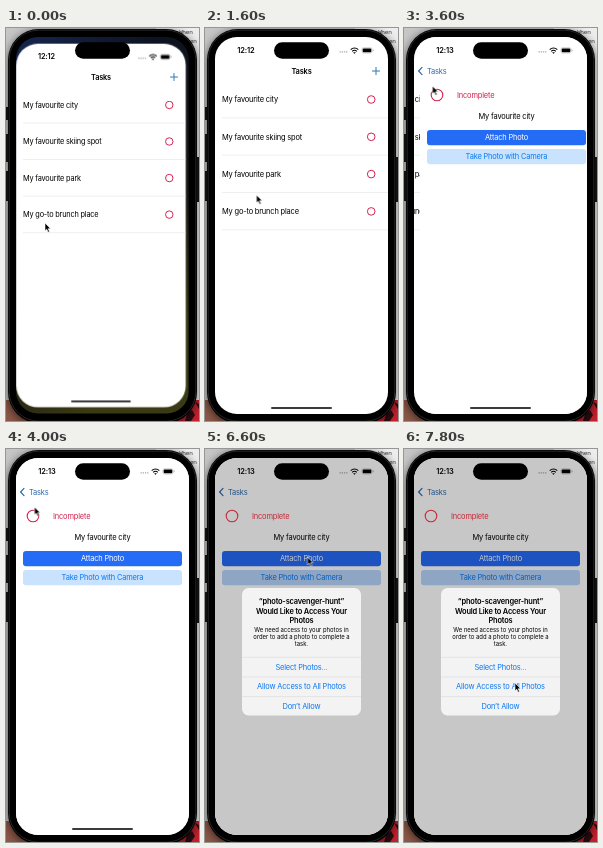
These frames come from a looping animation (193 by 393 pixels, 8000 ms). An HTML page:

```html
<!DOCTYPE html>
<html lang="en">
<head>
<meta charset="utf-8">
<title>Tasks</title>
<style>
html, body { margin: 0; width: 100%; height: 100%; overflow: hidden; background: #cfcfcf; }
svg, .app { position: absolute; left: 0; top: 0; }
svg { overflow: hidden; }
text { font: 7.48px Inter, "Open Sans", sans-serif; letter-spacing: -.025em; }
.mono { font: 6px "Noto Sans Mono", monospace; fill: #333; }
.bold { font-weight: 600; }
.mid { text-anchor: middle; }
.small { font-size: 5.9px; letter-spacing: 0; }
.ring { fill: none; stroke: currentColor; }
.pink { color: #d3214f; }
.line { stroke: #e4e4e6; stroke-width: .6; }
.tint { fill: #0a78f0; }
.shadow { filter: blur(5px); }
.app {
  left: 10px; top: 9px; width: 172.6px; height: 376.5px;
  overflow: hidden; border-radius: 22px; background: #fff; transform-origin: 0 0;
}
.home {
  position: absolute; left: 56px; bottom: 5px; width: 61px; height: 2px;
  border-radius: 1px; background: #3b3b3d;
}

/* The scene advances in 200 ms ticks: 2.5% of the loop each. */
.app, .list, .detail, .list-nav, .detail-nav, .before, .after,
.dim, .home, .take, .status, .cursor {
  animation: 8s step-end infinite;
}
.app { animation-name: launch; }
.list { animation-name: list; }
.detail { animation-name: detail; }
.list-nav { animation-name: fade-out; }
.detail-nav { animation-name: fade-in; }
.before { animation-name: before; }
.after { animation-name: after; }
.dim { animation-name: dim; }
.home { animation-name: home; }
.take { animation-name: take; }
.status { animation-name: status; }
.cursor { animation-name: cursor; }

@keyframes launch {
  0% { transform: translate(.2px, 6.7px) scale(.98); height: 370.7px; }
  2.5%, 100% { transform: none; height: 376.5px; }
}
@keyframes list {
  0% { transform: none; }
  42.5% { transform: translateX(-36px); }
  45%, 100% { transform: translateX(-50px); }
}
@keyframes detail {
  0% { transform: translateX(174px); }
  42.5% { transform: translateX(50px); }
  45% { transform: translateX(6px); }
  47.5%, 100% { transform: none; }
}
@keyframes fade-out { 0% { opacity: 1; } 42.5% { opacity: .3; } 45%, 100% { opacity: 0; } }
@keyframes fade-in { 0% { opacity: 0; } 42.5% { opacity: .7; } 45%, 100% { opacity: 1; } }
@keyframes before { 0% { opacity: 1; } 42.5%, 100% { opacity: 0; } }
@keyframes after { 0% { opacity: 0; } 42.5%, 100% { opacity: 1; } }
@keyframes dim { 0% { opacity: 0; } 77.5% { opacity: .5; } 80%, 100% { opacity: 1; } }
@keyframes home { 0% { opacity: 1; } 77.5% { opacity: .5; } 80%, 100% { opacity: 0; } }
@keyframes take { 0% { fill: #c9e3ff; } 77.5%, 100% { fill: #b6d4fc; } }
@keyframes status { 0% { color: #d3214f; } 77.5%, 100% { color: #ff3347; } }
@keyframes cursor {
  0% { transform: translate(39px, 195px); }
  17.5% { transform: translate(39px, 195px); animation-timing-function: steps(4); }
  27.5% { transform: translate(89px, 83px); }
  35% { transform: translate(89px, 83px); animation-timing-function: steps(3); }
  42.5% { transform: translate(28.5px, 58px); }
  60% { transform: translate(28.5px, 58px); animation-timing-function: steps(4); }
  70% { transform: translate(102.5px, 108px); }
  87.5% { transform: translate(102.5px, 108px); animation-timing-function: steps(3); }
  95%, 100% { transform: translate(111px, 234px); }
}
</style>
</head>
<body>
<!-- Desktop and phone body -->
<svg width="193" height="393" viewBox="0 0 193 393">
  <defs>
    <linearGradient id="wallpaper" x1="0" y1="0" x2=".4" y2="1">
      <stop offset="0" stop-color="#16264f"/>
      <stop offset=".3" stop-color="#0c1220"/>
      <stop offset=".7" stop-color="#1c1a14"/>
      <stop offset="1" stop-color="#3a3a14"/>
    </linearGradient>
  </defs>
  <rect width="193" height="393" fill="#c6c6c6"/>
  <rect x="150" width="43" height="393" fill="#ededed"/>
  <text class="mono" x="166" y="6">l When</text>
  <text class="mono" x="177" y="15">When</text>
  <rect y="372" width="40" height="21" fill="#8b5848"/>
  <rect x="150" y="372" width="43" height="21" fill="#c4202c"/>
  <path d="M181 386l5-4 3 5-4 6h-6zM189 374l4 2v5z" fill="#2a0c10"/>
  <rect class="shadow" x="2" y="3" width="189" height="394" rx="31" opacity=".6"/>
  <path d="M0 79h3v13H0zM0 106h3v28H0zM0 143h3v30H0zM190 129h3v45h-3z" fill="#111"/>
  <rect x="2" y="1" width="189" height="394" rx="31" fill="#000"/>
  <rect x="3.2" y="2.2" width="186.6" height="391" rx="29.5" fill="none" stroke="#303032" stroke-width=".8"/>
  <rect x="10" y="9" width="172.6" height="376.5" rx="22" fill="url(#wallpaper)"/>
</svg>

<div class="app">
  <svg width="173" height="377" viewBox="10 9 173 377">
    <g class="list pink" id="list"></g>

    <g class="detail">
      <rect x="10" y="9" width="173" height="377" fill="#fff"/>
      <g class="status">
        <circle class="ring" cx="27" cy="67" r="5.8" stroke-width="1.1"/>
        <text x="47" y="69.7" fill="currentColor">Incomplete</text>
      </g>
      <text class="mid" x="96.5" y="90.7">My favourite city</text>
      <rect x="17" y="102" width="159" height="15.2" rx="3" fill="#246bf6"/>
      <text class="mid" x="96.5" y="112.3" fill="#fff">Attach Photo</text>
      <rect class="take" x="17" y="121" width="159" height="15.2" rx="3"/>
      <text class="mid tint" x="96.5" y="131.3">Take Photo with Camera</text>
    </g>

    <g class="list-nav">
      <text class="mid bold" x="96.5" y="45.7">Tasks</text>
      <path d="M167 43h8M171 39v8" stroke="#2a78b8"/>
    </g>
    <g class="detail-nav">
      <path d="M18 39.4L14.6 43l3.4 3.6" fill="none" stroke="#2a68ad" stroke-width="1.2" stroke-linecap="round"/>
      <text x="23" y="45.7" fill="#2a68ad">Tasks</text>
    </g>

    <text class="bold before" x="32.3" y="25.1">12:12</text>
    <text class="bold after" x="32.3" y="25.1">12:13</text>
    <path d="M134.5 23.8h8" stroke="#aaa" stroke-width="1.3" stroke-dasharray="1.3 .9"/>
    <g fill="none" stroke="#000" stroke-width="1.1">
      <path d="M145.7 21.6a5.4 5.4 0 0 1 7.6 0M147.2 23.3a3.2 3.2 0 0 1 4.6 0"/>
      <path d="M148.7 24.6h1.6l-.8.8z" stroke-width=".8"/>
    </g>
    <rect x="157" y="19.8" width="10" height="5.2" rx="1.6" fill="none" stroke="#999" stroke-width=".5"/>
    <rect x="157.7" y="20.5" width="8.6" height="3.8" rx="1" fill="#000"/>
    <path d="M168.2 21.6v1.6" stroke="#999" stroke-width=".7"/>
  </svg>

  <div class="home"></div>

  <svg class="dim" width="173" height="377" viewBox="10 9 173 377">
    <rect x="10" y="9" width="173" height="377" fill="#000" opacity=".22"/>
    <rect x="37" y="139" width="119" height="127.5" rx="6.5" fill="#f3f3f4"/>
    <path d="M37 208.3h119M37 228h119M37 247.6h119" stroke="#d2d2d5" stroke-width=".5"/>
    <g class="mid">
      <text class="bold" x="96.5" y="155.2">“photo-scavenger-hunt”</text>
      <text class="bold" x="96.5" y="164.8">Would Like to Access Your</text>
      <text class="bold" x="96.5" y="174.4">Photos</text>
      <text class="small" x="96.5" y="183.4">We need access to your photos in</text>
      <text class="small" x="96.5" y="190.4">order to add a photo to complete a</text>
      <text class="small" x="96.5" y="197.4">task.</text>
      <text class="tint" x="96.5" y="220.6">Select Photos...</text>
      <text class="tint" x="96.5" y="240.4">Allow Access to All Photos</text>
      <text class="tint" x="96.5" y="260">Don’t Allow</text>
    </g>
  </svg>
</div>

<svg width="193" height="393" viewBox="0 0 193 393">
  <rect x="69" y="14.3" width="55" height="16.4" rx="8.2" fill="#000"/>
  <path class="cursor" d="M0 0V7.8L1.8 6.2 3.1 9.2 4.5 8.6 3.2 5.7H5.6Z" fill="#000" stroke="#fff" stroke-width=".6"/>
</svg>

<script>
const tasks = ["My favourite city", "My favourite skiing spot", "My favourite park", "My go-to brunch place"];
document.getElementById("list").innerHTML = tasks.map((task, i) => {
  const y = 71.5 + i * 37.3;
  return `<text x="17" y="${y + 2.7}">${task}</text>
    <circle class="ring" cx="166.2" cy="${y}" r="3.8"/>
    <path class="line" d="M17 ${y + 18.4}H183"/>`;
}).join("");
</script>
</body>
</html>
```
